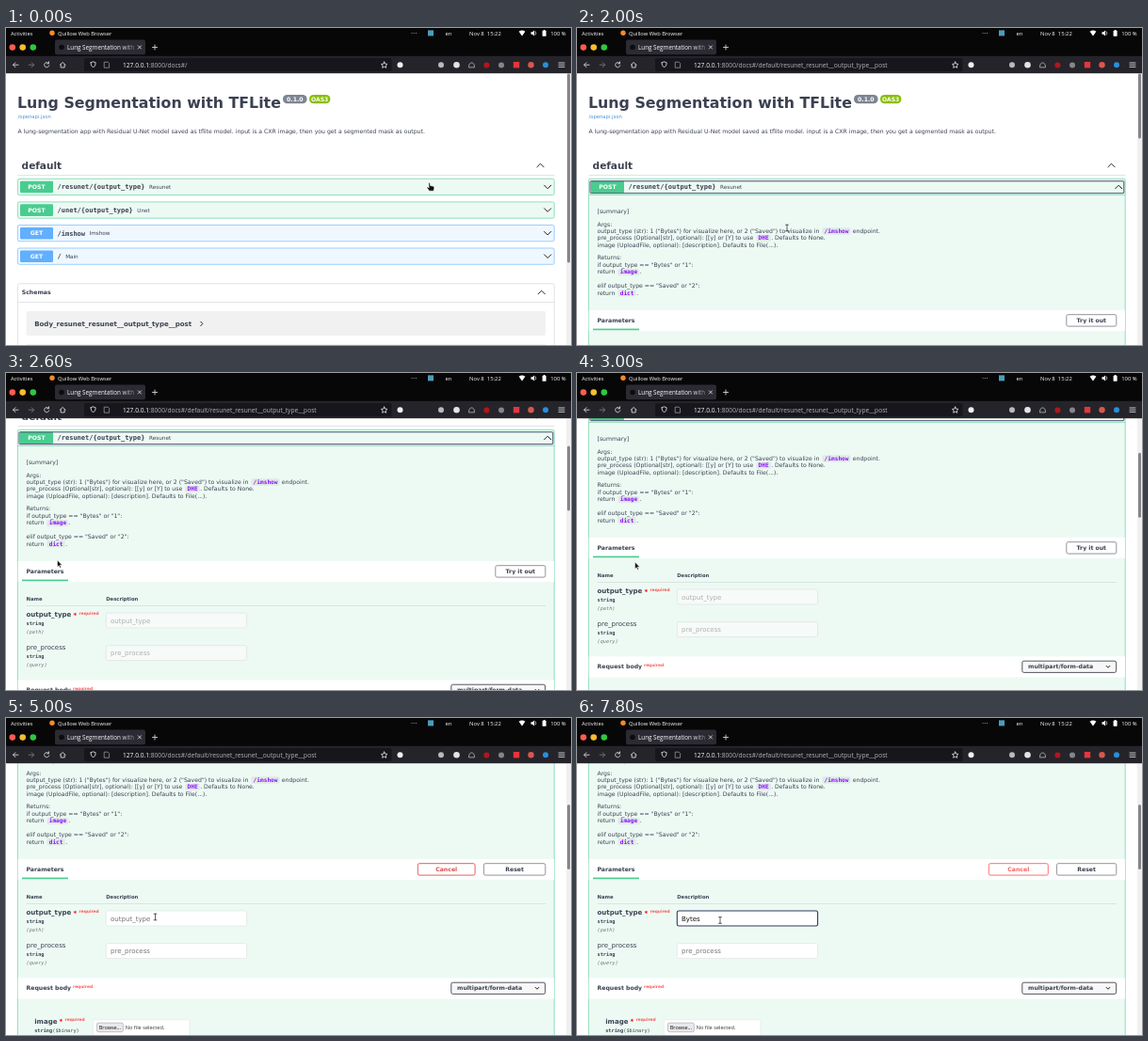
An HTML page that plays this animation: 600x337 px, repeating every 8 s.

```html
<!DOCTYPE html>
<html lang="en">
<head>
<meta charset="utf-8">
<title>API docs</title>
<style>
html, body { margin: 0; width: 100%; height: 100%; overflow: hidden; background: #fff; }
svg { display: block; width: 100vw; height: 100vh; }
text { white-space: pre; font-family: "DejaVu Sans", sans-serif; fill: #3b4151; }
.ui { font-family: "Open Sans", sans-serif; fill: #fbfbfe; }
.m { font-family: "DejaVu Sans Mono", monospace; }
.b { font-weight: 700; }
.i { font-style: italic; }
.c { text-anchor: middle; }
.w { fill: #fff; }
.line { fill: none; stroke: #d6d6dc; stroke-width: .9; stroke-linecap: round; stroke-linejoin: round; }
</style>
</head>
<body>
<svg id="stage" viewBox="0 0 600 337" preserveAspectRatio="none"></svg>
<script>
const GREEN = '#49cc90', BLUE = '#61affe', INK = '#3b4151', RED = '#ff6060';
const S = { body: 6.15, big: 7.03, small: 5.27, tiny: 4.39 };

const text = (x, y, size, str, cls = '', fill = '') =>
  `<text x="${x}" y="${y}" font-size="${size}" class="${cls}"${fill && ` style="fill:${fill}"`}>${str}</text>`;
const rect = (x, y, w, h, fill, extra = '') =>
  `<rect x="${x}" y="${y}" width="${w}" height="${h}" fill="${fill}" ${extra}/>`;
const dot = (x, y, r, fill) => `<circle cx="${x}" cy="${y}" r="${r}" fill="${fill}"/>`;
const edge = (color, width = .6, r = 1.8) => `stroke="${color}" stroke-width="${width}" rx="${r}"`;
const path = (d, color = '', width = .9) =>
  `<path class="line" d="${d}"${color && ` style="stroke:${color};stroke-width:${width}"`}/>`;
const chevron = (x, y, dir, s = 3.6) =>
  path(`M${x - s} ${y - dir * s / 2}l${s} ${dir * s}l${s} ${-dir * s}`, '#222', 1);
const group = (id, body) => `<g id="${id}">${body}</g>`;
const required = (x, y) => text(x, y, S.tiny, 'required', 'b', 'rgba(255,0,0,.65)');
const star = (x, y) => text(x, y, S.big, '*', 'b', 'red');

function chip(x, y, str) {
  return rect(x, y - 5.5, str.length * 3.7 + 4.4, 7.4, 'rgba(0,0,0,.06)', 'rx="1.6"') +
    text(x + 2.2, y, S.body, str, 'm b', '#9012fe');
}

function opHead(y, verb, route, note, color, dir) {
  return rect(15, y + 2.7, 35, 12.6, color, 'rx="1.3"') +
    text(32.5, y + 11.2, S.body, verb, 'b c w') +
    text(54.5, y + 11.4, S.big, route, 'm b') +
    text(56.5 + route.length * 4.232 + 2.4, y + 11, 5.71, note) +
    chevron(575.2, y + 9, dir);
}

function opRow(y, verb, route, note) {
  const post = verb === 'POST', color = post ? GREEN : BLUE;
  return rect(12.4, y + .3, 569.8, 17.3, post ? '#edfaf4' : '#eff7ff', edge(color)) +
    opHead(y, verb, route, note, color, 1);
}

function button(x, y, w, label, color, border = color) {
  return rect(x, y, w, 12.4, 'none', edge(border, .9)) +
    text(x + w / 2, y + 8.4, S.body, label, 'b c', color);
}

function field(id, y, name) {
  return rect(106.3, y, 149.3, 16, '#fff', `id="${id}" ` + edge('#d9d9d9', .5)) +
    text(111, y + 10.5, S.big, name, '', '#757575').replace('<text', `<text id="${id}Text"`);
}

const intro = text(12, 85.2, 15.82, 'Lung Segmentation with TFLite', 'b') +
  rect(294, 71, 25.6, 9.3, '#7d8492', 'rx="4.6"') + text(306.8, 78, 6.2, '0.1.0', 'b c w') +
  rect(322, 71, 22.4, 9.3, '#89bf04', 'rx="4.6"') + text(333.2, 78, 6.1, 'OAS3', 'b c w') +
  text(12.4, 95.7, S.small, '/openapi.json', '', '#4990e2') +
  text(12.4, 112.2, S.body, 'A lung-segmentation app with Residual U-Net model saved as tflite model. ' +
    'input is a CXR image, then you get a segmented mask as output.') +
  text(16.6, 150, 10.54, 'default', 'b') + chevron(567.5, 146, -1) +
  rect(12.4, 156.2, 570, .5, '#c4c6cb');

const closed = opRow(160, 'POST', '/resunet/{output_type}', 'Resunet') +
  opRow(184.6, 'POST', '/unet/{output_type}', 'Unet') +
  opRow(209.2, 'GET', '/imshow', 'Imshow') +
  opRow(233.7, 'GET', '/', 'Main') +
  rect(12.4, 271.8, 569.8, 120, 'none', edge('#c4c6cb', .5)) +
  text(16.8, 283.4, S.body, 'Schemas', 'b') + chevron(568.7, 281, -1) +
  rect(12.4, 291, 569.8, .5, '#c4c6cb') +
  rect(21.6, 301, 551.4, 26, '#f1f1f2', 'rx="1.8"') +
  text(30.2, 316.6, S.big, 'Body_resunet_resunet__output_type__post', 'b') +
  path('M206.8 312.2l2 2.2l-2 2.2', '#222', 1) +
  rect(21.6, 335.8, 551.4, 26, '#f1f1f2', 'rx="1.8"');

const docs = [
  [196.6, '[summary]'], [210.5, 'Args:'],
  [217.8, 'output_type (str): 1 ("Bytes") for visualize here, or 2 ("Saved") to visualize in'],
  [225.2, 'pre_process (Optional[str], optional): [[y] or [Y] to use'],
  [232.6, 'image (UploadFile, optional): [description]. Defaults to File(...).'],
  [246.2, 'Returns:'], [253.8, 'if output_type == "Bytes" or "1":'], [261.4, 'return'],
  [276, 'elif output_type == "Saved" or "2":'], [283.6, 'return']
].map(([y, str]) => text(21.5, y, S.body, str)).join('');

const opened = rect(12.4, 160.3, 569.8, 700, '#edfaf4', edge(GREEN)) +
  opHead(160, 'POST', '/resunet/{output_type}', 'Resunet', GREEN, -1) +
  rect(14, 162.8, 566.8, 12.9, 'none', edge('#34385c', .9, .8)) +
  rect(12.4, 177.4, 569.8, .5, GREEN) +
  docs + chip(260.4, 217.8, '/imshow') + text(292.8, 217.8, S.body, 'endpoint.') +
  chip(190.4, 225.2, 'DHE') + text(206.2, 225.2, S.body, '. Defaults to None.') +
  chip(43.5, 261.4, 'image') + text(66.8, 261.4, S.body, '.') +
  chip(43.5, 283.6, 'dict') + text(63.2, 283.6, S.body, '.') +
  rect(12.7, 300, 569.2, 22, '#fff') +
  text(21.5, 313, S.body, 'Parameters', 'b') + rect(17, 319.6, 49, 1.7, GREEN) +
  group('tryOut', button(519.8, 304.7, 53, 'Try it out', INK, '#85888f')) +
  group('early', button(437.3, 304.7, 60.8, 'Cancel', '#dc5050') + button(507.4, 304.7, 65.4, 'Reset', INK, '#85888f')) +
  group('late', button(437.3, 304.7, 63, 'Cancel', RED) + button(509.4, 304.7, 63.4, 'Reset', INK, '#85888f')) +
  text(21.5, 341.6, S.small, 'Name', 'b') + text(106.2, 341.6, S.small, 'Description', 'b') +
  rect(21.5, 347.3, 551.5, .5, '#c4ccca') +
  text(21.5, 359.3, S.big, 'output_type', 'b') + star(71.6, 359.8) + required(77.6, 356.7) +
  text(21.5, 368.4, S.small, 'string', 'm b') + text(21.5, 377.3, S.small, '(path)', 'm i', '#777') +
  field('out', 355, 'output_type') + rect(0, 358.5, .6, 9, '#000', 'id="caret"') +
  text(21.5, 394, S.big, 'pre_process') +
  text(21.5, 403.4, S.small, 'string', 'm b') + text(21.5, 412.2, S.small, '(query)', 'm i', '#777') +
  field('pre', 389.6, 'pre_process') +
  rect(12.7, 426.4, 569.2, 22, '#fff') +
  text(21.5, 439.3, S.body, 'Request body', 'b') + required(71, 436.8) +
  rect(472.8, 431.2, 99.8, 12.2, '#f7f7f7', edge('#41444e', .9)) +
  text(479, 439.4, S.body, 'multipart/form-data', 'b') + chevron(564, 437.3, 1, 1.9) +
  text(30.2, 475, S.big, 'image', 'b') + star(56.6, 475.4) + required(62.6, 472.4) +
  text(30.2, 484, S.small, 'string<tspan font-weight="400">($binary)</tspan>', 'm b') +
  group('file', rect(92.3, 470.8, 102.6, 17, '#fff', edge('#dde3e0', .5)) +
    rect(96.4, 474.1, 28, 9.6, '#e9e9ed', edge('#8f8f9d', .5)) +
    text(110.4, 480.8, 5.5, 'Browse...', 'ui c', '#111') +
    text(126.8, 480.8, 5.62, 'No file selected.', 'ui', '#333'));

const chrome = rect(0, 0, 600, 30, '#070708') + rect(0, 29.8, 600, 18.4, '#25242b') +
  text(5, 8, 5.7, 'Activities', 'ui') + dot(49, 5.3, 2.7, '#f58a2a') +
  text(55, 8, 5.75, 'Quillow Web Browser', 'ui') +
  [431, 433.2, 435.4].map(x => dot(x, 5.4, .5, '#bbb')).join('') +
  rect(448, 2.4, 6, 6, '#4c9db8') +
  text(466.4, 8, 5.8, 'en', 'ui') + text(492, 8, 5.9, 'Nov 8  15:22', 'ui') +
  '<path d="M544.6 3.7Q548 1.2 551.4 3.7L548 8.4Z" fill="#fff"/>' +
  '<path d="M557.5 4.3h1.6l2-1.8v6l-2-1.8h-1.6Z" fill="#fff"/>' +
  path('M562.3 3.8q1.2 1.7 0 3.3', '#fff', .7) +
  rect(569.6, 2.8, 4, 6, '#fff', 'rx=".6"') + rect(570.8, 2, 1.6, 1, '#fff') +
  text(578.2, 8, 5.9, '100 %', 'ui') +
  dot(6.8, 20.6, 3.3, '#ff5b51') + dot(17.7, 20.6, 3.3, '#f5bd30') + dot(28.8, 20.6, 3.3, '#2ec840') +
  rect(52, 12.6, 96, 15.6, '#2c2b33', 'rx="1.8"') + dot(59, 20.5, 2.8, '#0c0c0e') +
  text(65, 22.9, 6.3, 'Lung Segmentation with', 'ui').replace('style', '').replace('class="ui"', 'class="ui" style="fill:url(#fade)"') +
  path('M140.3 18.8l3.2 3.2m0-3.2l-3.2 3.2M155.5 20.5h5m-2.5-2.5v5') +
  path('M13 39.2h-5.4m2.4-2.5l-2.5 2.5l2.5 2.5') +
  path('M24.2 39.2h5.4m-2.4-2.5l2.5 2.5l-2.5 2.5', '#77767d') +
  path('M45.2 37.4a2.6 2.6 0 1 0 .6 2.5m-.3-4v1.9h-1.9') +
  path('M57.3 39.2l2.9-2.7l2.9 2.7m-4.9-.4v3.2h4v-3.2') +
  rect(83, 32, 326.5, 14.2, '#17161c', 'rx="1.8"') +
  path('M90 36.8l2.6-1l2.6 1q.2 3.6-2.6 5.2q-2.800-1.600-2.600-5.200') +
  path('M104.600 36.200h3.600l1.400 1.400v4.600h-5z', '#aaa', .7) +
  '<text id="url" class="ui" x="124" y="41.700" font-size="6.63"></text>' +
  path('M401.700 36l1 2.100l2.300.3l-1.700 1.600l.4 2.300l-2-1.100l-2 1.100l.4-2.300l-1.700-1.600l2.300-.3z', '', .7) +
  dot(418.500, 39.2, 3, '#f2f2f2') + dot(462, 39.2, 3, '#b9b9be') + dot(478.5, 39.2, 3.3, '#e4e4e4') +
  path('M491.500 41.500q0-4.500 3-4.500t3 4.500z', '#bbb', .8) +
  dot(510.4, 39.4, 3, '#b3161c') + dot(526, 39.4, 3, '#85858b') +
  rect(538.800, 36, 6.4, 6.4, '#e3363d') + dot(557.5, 39.2, 3.2, '#d9584e') + dot(573, 39.2, 3, '#2a8ed8') +
  path('M587 37h6m-6 2.200h6m-6 2.200h6');

const cursors = {
  hand: '<path d="M-1.700-4.200q.8-.7 1.400.2l.3 2.500l3.300.8q1.200.4 1 1.700l-.7 3.200h-4.600l-2.500-3.500q.2-1 1.300-.5l.9.800z" fill="#111" stroke="#fff" stroke-width=".5"/>',
  arrow: '<path d="M-.5-4v7.200l1.700-1.500l1.200 2.500l1.100-.5l-1.200-2.500h2.300z" fill="#111" stroke="#fff" stroke-width=".5"/>',
  beam: path('M-1.400-3.300h2.800M0-3.300v6.600M-1.400 3.300h2.800', '#222', .7),
  stop: '<circle r="3" fill="#fff" stroke="#111" stroke-width="1.500"/>' + path('M-2-2l4 4', '#111', 1.3)
};

const stage = document.getElementById('stage');
stage.innerHTML = '<defs><linearGradient id="fade"><stop offset=".8" stop-color="#fbfbfe"/>' +
  '<stop offset="1" stop-color="#fbfbfe" stop-opacity=".35"/></linearGradient></defs>' +
  group('page', intro + group('closed', closed) + group('opened', opened)) +
  rect(595, 48, 5, 289, '#f0f0f0') + rect(596, 48.5, 3, 200, '#85858a', 'id="thumb" rx="1.5"') + chrome +
  group('cursor', Object.entries(cursors).map(([id, body]) => group(id, body)).join(''));

const el = id => document.getElementById(id);
const show = (id, on) => el(id).setAttribute('display', on ? 'inline' : 'none');
const set = (id, attrs) => { for (const k in attrs) el(id).setAttribute(k, attrs[k]); };

// time, x, y
const moves = [
  [0, 450.500, 169], [1200, 459.500, 169], [1600, 459, 169], [2000, 223, 212.5], [2600, 55, 203],
  [3000, 62, 205], [3800, 143, 212.4], [4400, 546, 161], [4600, 546, 161],
  [5000, 158.500, 211.500], [5600, 152, 214], [7800, 152, 215]
];
const scrolls = [[0, 0], [2200, 0], [2600, 100], [2800, 100], [3200, 150]];
const shapes = [[0, 'hand'], [2000, 'beam'], [2400, 'arrow'], [3800, 'stop'], [4000, 'arrow'], [4400, 'hand'], [4800, 'beam']];

function track(keys, t, col = 1) {
  const n = keys.findIndex(k => k[0] > t);
  if (n < 0) return keys[keys.length - 1][col];
  const a = keys[n - 1], b = keys[n];
  return a[col] + (b[col] - a[col]) * (t - a[0]) / (b[0] - a[0]);
}

function draw(t) {
  const open = t >= 1600, edit = t >= 4600, focus = t >= 5800;
  const scroll = track(scrolls, t);
  const typed = 'Bytes'.slice(0, Math.max(0, Math.floor((t - 6200) / 200)));

  show('closed', !open);
  show('opened', open);
  set('page', { transform: `translate(0 ${-scroll})` });
  set('thumb', { y: 48.5 + scroll * .29, height: open ? 69 : 201 });
  el('url').innerHTML = '127.0.0.1<tspan fill="#b4b4bb">:8000/docs#/' +
    (open ? 'default/resunet_resunet__output_type__post' : '') + '</tspan>';

  show('tryOut', !edit);
  show('early', edit && t < 5200);
  show('late', t >= 5200);
  show('file', edit);
  for (const id of ['out', 'pre']) {
    set(id, { fill: edit ? '#fff' : '#f6faf8' });
    el(id + 'Text').style.fill = edit ? '#757575' : '#adb0af';
  }
  set('out', { stroke: focus ? '#34385c' : '#d9d9d9', 'stroke-width': focus ? 1.1 : .5 });
  el('outText').textContent = typed || 'output_type';
  if (typed) el('outText').style.fill = '#111';
  show('caret', focus && t < 7400 && t % 1000 < 500);
  set('caret', { x: 111 + typed.length * 4 });

  const shape = shapes.filter(s => s[0] <= t).pop()[1];
  Object.keys(cursors).forEach(id => show(id, id === shape));
  set('cursor', { transform: `translate(${track(moves, t)} ${track(moves, t, 2)})` });
}

const start = performance.now();
function tick() {
  const t = (performance.now() - start) % 8000;
  draw(Math.floor(t / 200) * 200);
  requestAnimationFrame(tick);
}
tick();
</script>
</body>
</html>
```
